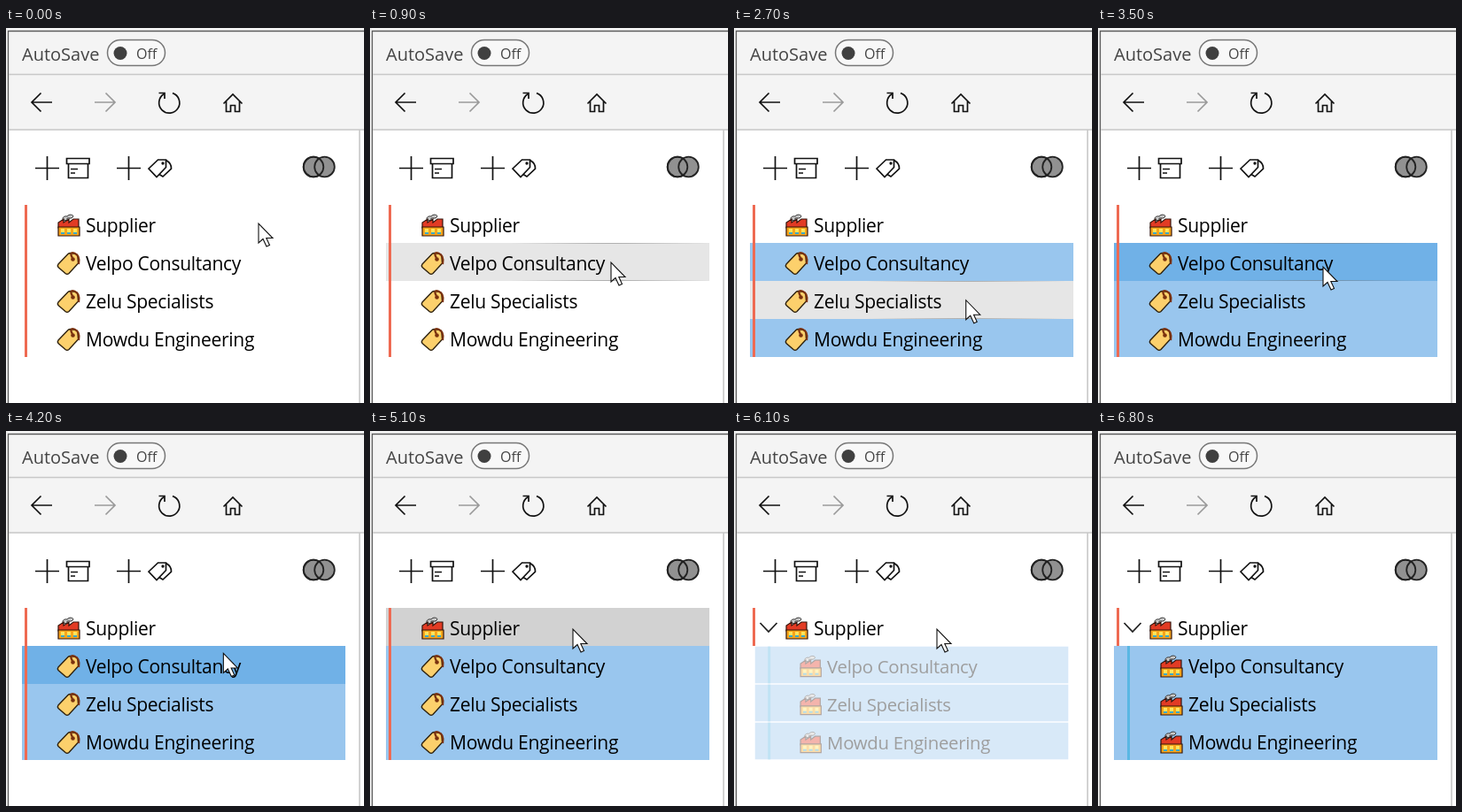
An HTML page that plays this animation: 404x424 px, repeating every 7.3 s.

```html
<!DOCTYPE html>
<html lang="en">
<head>
<meta charset="utf-8">
<title>Tag list</title>
<style>
  html, body { margin: 0; width: 100%; height: 100%; overflow: hidden; background: #fff; }
  svg { display: block; width: 404px; height: 424px; }
  text { font-family: "Open Sans", "Noto Sans", sans-serif; }
  .label { font-size: 21px; letter-spacing: -.28px; fill: #000; }
  .icon { fill: none; stroke: #111; stroke-width: 1.7; }
</style>
</head>
<body>
<svg viewBox="0 0 404 424">
  <defs>
    <g id="tag">
      <path d="M1 24L12 12.5Q13 11.5 15 11.5L20 12.2Q23 13 23 16L23.5 23L13 34.5Q11 36 9 34.5L1 27.5Q-.3 25.7 1 24Z"
        fill="#fcd06c" stroke="#2e210e" stroke-width="1.4"/>
      <circle cx="17.5" cy="18.5" r="2.3" fill="#7a310f"/>
      <path d="M17 17Q13 10 19 11.5Q26 14 24 24" fill="none" stroke="#7a310f" stroke-width="2.3"/>
    </g>
    <g id="factory">
      <path d="M7 17C4 15 8 12 11 13C13 10 18 11 18 13L16 15H11V18Z" fill="#c9c9c9" stroke="#333"/>
      <path d="M1 26V20L7 16V20L13 16V20L18 16H24V26Z" fill="#e23b24" stroke="#33150d" stroke-width="1.2"/>
      <path d="M1 25H25V35H1Z" fill="#f8a51b" stroke="#33150d" stroke-width="1.2"/>
      <path d="M4 29H22" stroke="#ffe45c" stroke-width="4" stroke-dasharray="4 3"/>
      <path d="M4 32H22" stroke="#3aa7c9" stroke-width="2" stroke-dasharray="4 3"/>
    </g>
    <radialGradient id="reveal" gradientUnits="userSpaceOnUse" cx="0" cy="0" r="115">
      <stop offset="0" stop-color="#777" stop-opacity=".6"/>
      <stop offset="1" stop-color="#777" stop-opacity="0"/>
    </radialGradient>
  </defs>

  <rect width="404" height="424" fill="#fff"/>
  <rect width="404" height="115" fill="#f4f4f4"/>
  <rect width="2" height="424" fill="#ececec"/>
  <path d="M404 3.5H2.5V424" fill="none" stroke="#5c5c5c" stroke-width="1.3"/>
  <path d="M3 52.5H404M3 115H404M399 115V424" fill="none" stroke="#c8c8c8" stroke-width="1.6"/>

  <text x="18" y="36.5" font-size="20" fill="#444">AutoSave</text>
  <rect x="114.5" y="13.5" width="65" height="29" rx="14.5" fill="#f8f8f8" stroke="#777" stroke-width="1.5"/>
  <circle cx="129" cy="28.5" r="7.5" fill="#404040"/>
  <text x="147" y="35" font-size="16" fill="#444">Off</text>

  <g class="icon">
    <path d="M52 84H29M39.5 73.5L29 84L39.5 94.5"/>
    <path d="M100 84H123M112.5 73.5L123 84L112.5 94.5" stroke="#9a9a9a"/>
    <path d="M188 73.6A11.6 11.6 0 1 1 178 74.8M172.5 73.5H179V80"/>
    <path d="M245.5 85.5L256 75L266.500 85.500M248.500 83V94.500H253.500V87.500H258.500V94.500H263.500V83"/>
    <path d="M33 158.500H60M46.500 145V172M125 158.500H152M138.500 145V172"/>
    <path d="M68.500 147.500H94V153.500H68.500ZM70.500 153.500V169.500H92.500V153.500M73 159.500H81M73 164H78"/>
    <path d="M161 159L171.500 149H180.500V157.500L170 168.500ZM176 149H180Q187 153 186.500 159L177 168L173 165.500"/>
    <circle cx="177" cy="153" r=".8"/>
  </g>
  <g fill="#919191" stroke="#222" stroke-width="1.8">
    <circle cx="347" cy="157" r="11.300"/>
    <circle cx="359.500" cy="157" r="11.300"/>
    <circle cx="347" cy="157" r="11.300" fill="none"/>
  </g>

  <g id="rows"></g>
  <rect id="bar" x="21" y="200" width="3" fill="#ee6a52"/>
  <path id="chevron" d="M29.500 217L39 227L48.500 217" fill="none" stroke="#222" stroke-width="1.800"/>
  <path id="cursor" d="M0 0V22L5 17.500L9 26L12.500 24.500L8.800 16.500H16Z" fill="#fff" stroke="#111" stroke-width="1.100"/>
</svg>

<script>
const LOOP = 7300, STEP = 100, TOP = 200, ROW = 43;
const NEST = 5200, HIDE = 6800;
const names = ["Supplier", "Velpo Consultancy", "Zelu Specialists", "Mowdu Engineering"];
const selectedAt = [Infinity, 1200, 2900, 2100];
const path = [
  [0, 285, 221], [300, 290, 85], [600, 282, 326], [800, 270, 262], [900, 272, 265],
  [1200, 272, 265], [1800, 267, 335], [2100, 266, 337], [2600, 262, 308], [2900, 261, 307],
  [3400, 255, 269], [3500, 254, 270], [3900, 254, 268], [4600, 232, 226], [4900, 229, 224],
  [6600, 229, 224], [6700, 272, 339]
];

const $ = id => document.getElementById(id);
const show = (el, on) => el.setAttribute("visibility", on ? "visible" : "hidden");

const rows = names.map((name, i) => {
  const y = TOP + i * ROW;
  const g = document.createElementNS("http://www.w3.org/2000/svg", "g");
  g.innerHTML = `
    <rect x="18" y="${y}" width="365" height="${ROW}"/>
    <path d="M18 ${y + .5}H383M18 ${y + ROW - .5}H383" stroke="url(#reveal)"/>
    <rect x="33" y="${y}" width="3" height="${ROW}" fill="#59b7e3"/>
    <g><use href="#${i ? "tag" : "factory"}" x="58" y="${y}"/>
    <text class="label" x="90" y="${y + 31}">${name}</text></g>`;
  $("rows").append(g);
  const [back, edge, line, content] = g.children;
  return { g, back, edge, line, content, icon: content.firstChild, mid: y + ROW / 2 };
});

function cursorAt(t) {
  const k = path.findIndex(p => p[0] > t);
  if (k < 0) return path.at(-1).slice(1);
  const [t0, x0, y0] = path[k - 1], [t1, x1, y1] = path[k];
  const p = (t - t0) / (t1 - t0), e = p * p * (3 - 2 * p);
  return [x0 + (x1 - x0) * e, y0 + (y1 - y0) * e];
}

function rowFill(i, t, hover) {
  if (t >= NEST) return i ? "#99c6ee" : "none";
  if (t >= selectedAt[i]) return hover ? "#70b1e7" : "#99c6ee";
  if (!hover) return "none";
  return t > 3900 ? "#d2d2d2" : "#e6e6e6";
}

function draw(t) {
  const nested = t >= NEST;
  const [x, y] = cursorAt(t);
  const over = t > 0 && !nested ? Math.floor((y - TOP) / ROW) : -1;
  const grow = nested ? Math.min(1, Math.max(0, (t - 5800) / 800)) : 1;

  rows.forEach((r, i) => {
    const child = nested && i > 0, scale = child ? .95 + .05 * grow : 1;
    r.back.setAttribute("fill", rowFill(i, t, over === i));
    show(r.edge, over === i && t < 3900);
    show(r.line, child);
    r.content.setAttribute("transform", `translate(${child ? 12 : 0})`);
    r.icon.setAttribute("href", child || !i ? "#factory" : "#tag");
    r.g.setAttribute("opacity", child ? grow : 1);
    r.g.setAttribute("transform",
      `translate(200.5 ${r.mid}) scale(${scale}) translate(-200.5 ${-r.mid})`);
  });

  $("bar").setAttribute("height", nested ? ROW : ROW * 4);
  show($("chevron"), nested);
  show($("cursor"), t < HIDE);
  $("cursor").setAttribute("transform", `translate(${x} ${y})`);
  $("reveal").setAttribute("gradientTransform", `translate(${x} ${y})`);
}

const start = performance.now();
function tick() {
  const t = (performance.now() - start) % LOOP;
  draw(Math.floor(t / STEP) * STEP);
  requestAnimationFrame(tick);
}
tick();
</script>
</body>
</html>
```
